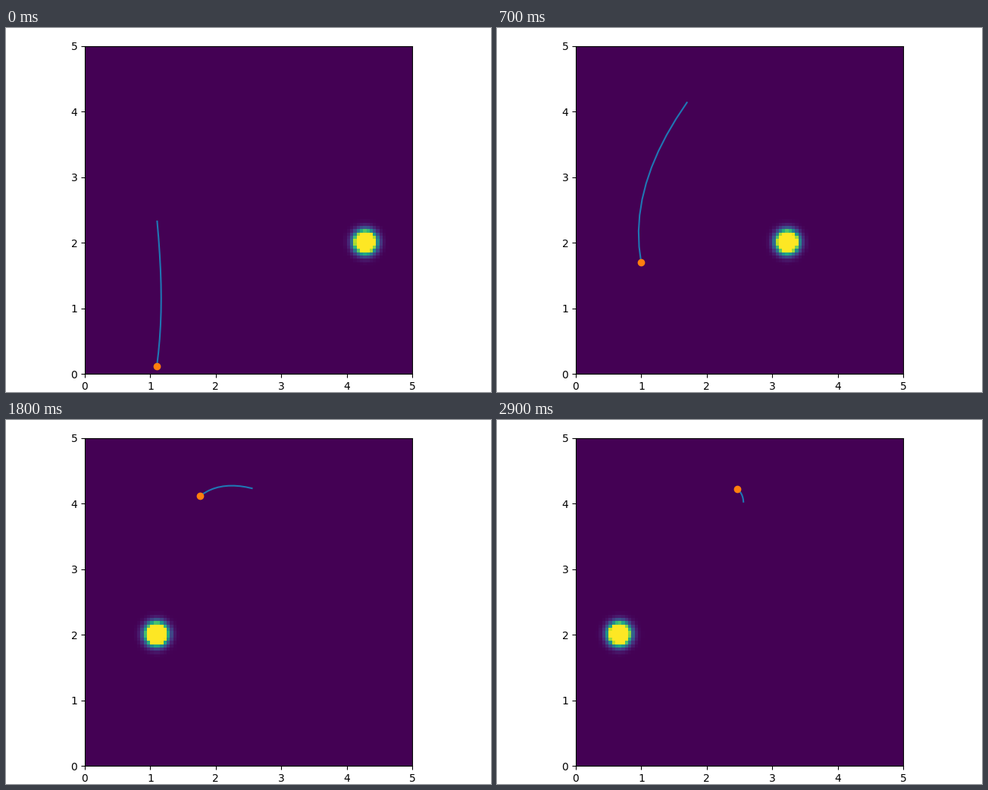
Animation, 640 px wide and 480 px high, one loop 3 s. Source, as a matplotlib script:

```python
import matplotlib.pyplot as plt
import numpy as np
from matplotlib.animation import FuncAnimation

FRAMES, INTERVAL = 30, 100
SIZE, CELLS, HORIZON = 5, 100, 10

# Waypoints x + iy of the robot and of the far end of its plan
TIMES = np.array([0, 4, 10, 14, 18, 22, 29])
ROBOT = np.array([1.10 + 0.115j, 1.068 + 0.845j, 1.008 + 2.61j, 1.33 + 3.594j,
                  1.759 + 4.115j, 2.118 + 4.277j, 2.465 + 4.22j])
TIP = np.array([1.107 + 2.327j, 1.262 + 3.525j, 2.158 + 4.465j, 2.43 + 4.375j,
                2.552 + 4.235j, 2.587 + 4.12j, 2.56 + 4.03j])

AXIS = np.linspace(0, SIZE, CELLS)
GRID_X, GRID_Y = np.meshgrid(AXIS, AXIS)


def glide(frame, points):
    """Smooth cubic motion through the waypoints."""
    slopes = np.gradient(points, TIMES)
    k = min(np.searchsorted(TIMES, frame, side="right") - 1, len(TIMES) - 2)
    span = TIMES[k + 1] - TIMES[k]
    u = (frame - TIMES[k]) / span
    ease = u * u * (3 - 2 * u)
    return (points[k] * (1 - ease) + points[k + 1] * ease
            + span * u * (1 - u) * (slopes[k] * (1 - u) - slopes[k + 1] * u))


def plan(frame):
    """Predicted positions: an arc that settles into a steady right turn."""
    start = glide(frame, ROBOT)
    # Early on the plan briefly swings to the left
    end = glide(frame, TIP) - 0.9 * np.exp(-1.5 * (frame - 2) ** 2)
    chord = end - start
    bend = 0.5 - 0.615 * np.exp(-frame / 3.5)
    leave = start + 0.32 * chord * np.exp(1.1j * bend)
    arrive = end - 0.4 * chord * np.exp(-0.8j * bend)
    t = np.linspace(0, 1, HORIZON + 1)
    s = 1 - t
    curve = (start * s**3 + 3 * leave * s**2 * t
             + 3 * arrive * s * t**2 + end * t**3)
    return curve.real, curve.imag


def obstacle(frame):
    """Gaussian density around the swinging obstacle."""
    x = 2.5 + 2 * np.cos(np.arccos(0.9) + 0.106 * frame)
    sigma = 0.1
    r2 = (GRID_X - x) ** 2 + (GRID_Y - 2) ** 2
    return np.exp(-r2 / (2 * sigma**2)) / (2 * np.pi * sigma**2)


fig = plt.figure(figsize=(6.4, 4.8), dpi=100)
ax = fig.add_axes([104 / 640, 0.05, 432 / 640, 0.9])
field = ax.imshow(obstacle(0), origin="lower", extent=[0, SIZE, 0, SIZE],
                  vmin=0, vmax=5, cmap="viridis", aspect="auto")
path, = ax.plot([], [], color="C0", lw=1.5)
robot, = ax.plot([], [], "o", color="C1")
ax.set(xlim=(0, SIZE), ylim=(0, SIZE),
       xticks=range(SIZE + 1), yticks=range(SIZE + 1))


def update(frame):
    x, y = plan(frame)
    field.set_data(obstacle(frame))
    path.set_data(x, y)
    robot.set_data(x[:1], y[:1])
    return field, path, robot


anim = FuncAnimation(fig, update, frames=FRAMES, interval=INTERVAL,
                     repeat=True, repeat_delay=0)
plt.show()
```
